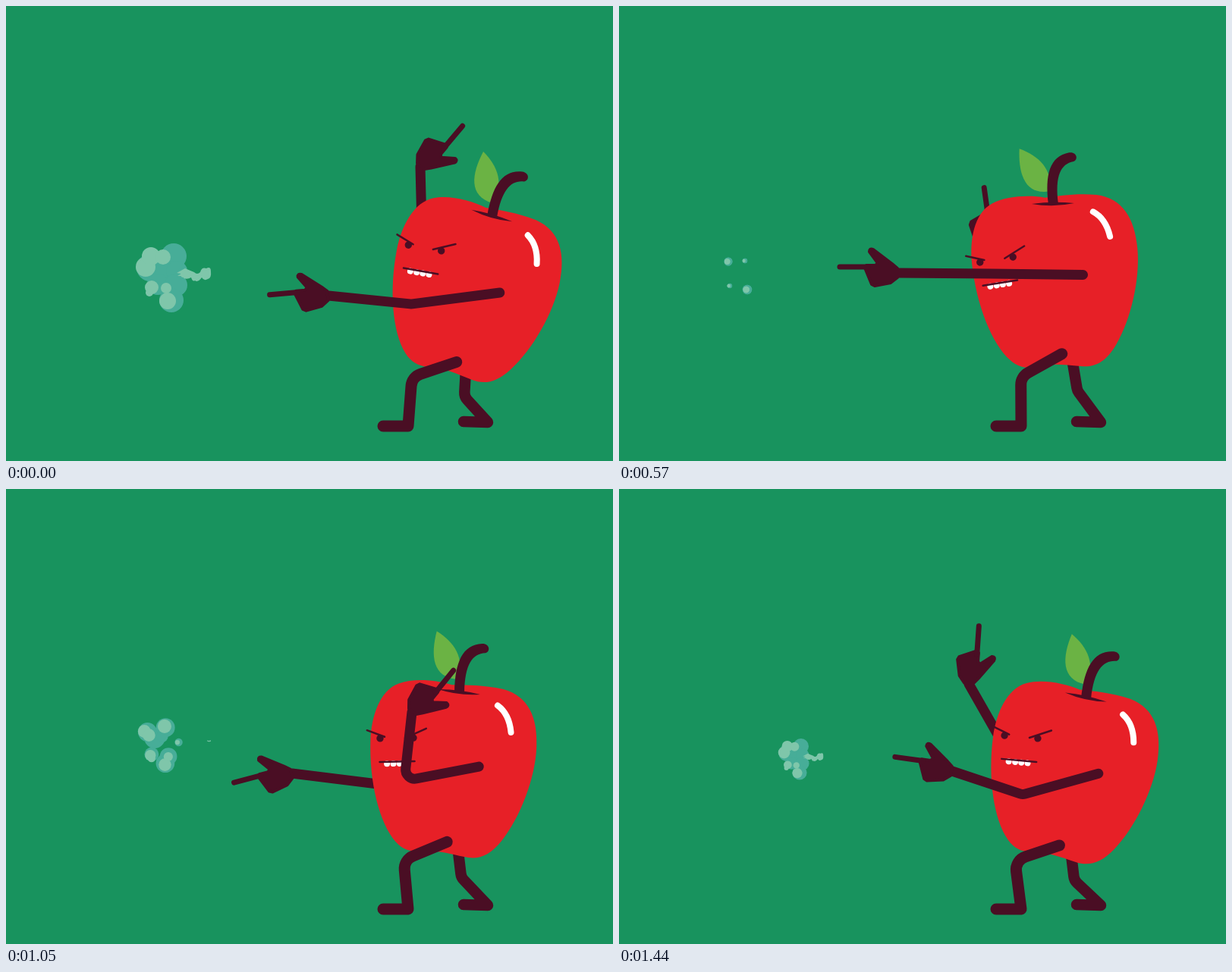
An HTML page with a canvas that plays this animation: 800x600 px, repeating every 1.47 s.

```html
<!DOCTYPE html>
<html lang="en">
<head>
<meta charset="utf-8">
<title>Finger-gun apple</title>
<style>
  html, body { margin: 0; overflow: hidden; }
  canvas { display: block; }
</style>
</head>
<body>
<canvas id="stage" width="800" height="600"></canvas>
<script>
const ctx = document.getElementById('stage').getContext('2d');
const LOOP = 1470, STEP = 30;
const GREEN = '#18935e', RED = '#e72027', DARK = '#4a0e24', LEAF = '#6bb344';
const MIST = '#47ad98', FOAM = '#7fc6aa';

// Tracks: [time, ...values]
const bodyTrack = [ // stem foot x, y, lean
  [0, 640, 278, 13], [30, 642, 277, 13.5], [360, 597, 258, 0], [570, 572, 262, -4],
  [675, 566, 264, -4], [750, 628, 268, 11], [780, 630, 267, 11.5], [1050, 597, 269, 4],
  [1290, 568, 268, -1], [1395, 564, 270, -2], [1440, 615, 276, 9.5]];
const faceTrack = [ // offset from the stem foot, tilt
  [0, -88, 41, 10], [360, -82.5, 62.5, -1], [570, -74.5, 72.5, -9], [675, -74, 72, -9],
  [750, -90, 50, 6], [1050, -82, 59.5, -1], [1290, -73, 67, -8], [1395, -73, 67, -8],
  [1440, -85, 51, 5]];
const frontArm = [ // elbow, wrist, hand angle
  [0, 534, 393, 425, 382, -5], [360, 498, 352, 368, 352, -4], [570, 490, 353, 368, 352, 0],
  [690, 530, 330, 440, 280, 80], [750, 557, 317, 553, 233, 138], [795, 556, 310, 556, 213, 136],
  [1050, 525, 385, 535, 294, 129], [1290, 529, 415, 472, 350, 56],
  [1395, 475, 370, 350, 360, 2], [1440, 532, 403, 439, 372, 8]];
const backArm = [ // hidden end, wrist, hand angle
  [0, 548, 290, 546, 212, 130], [30, 548, 290, 547, 210, 131], [360, 548, 310, 540, 268, 130],
  [570, 510, 350, 484, 317, 82], [675, 520, 375, 365, 342, 2], [720, 525, 398, 434, 345, 12],
  [750, 530, 403, 436, 347, 14], [1050, 530, 394, 377, 375, -15], [1290, 520, 380, 346, 371, 0],
  [1410, 520, 370, 400, 320, 55], [1440, 518, 357, 461, 257, 94]];
const backKnee = [
  [0, 604, 515], [360, 609, 504], [570, 604, 507], [750, 603, 513],
  [1050, 600, 512], [1290, 598, 511], [1440, 600, 516]];

// Cyclic cubic interpolation that never overshoots a key
function sample(track, t) {
  const n = track.length;
  const i = track.findLastIndex(k => k[0] <= t);
  const key = j => {
    const k = track[(j + n) % n].slice();
    k[0] += Math.floor(j / n) * LOOP;
    return k;
  };
  const [p, a, b, c] = [i - 1, i, i + 1, i + 2].map(key);
  const span = b[0] - a[0], u = (t - a[0]) / span;
  const tangent = (s, r) => s * r > 0 ? 2 * s * r / (s + r) : 0;
  return a.map((v, j) => {
    const slope = (q, r) => (r[j] - q[j]) / (r[0] - q[0]);
    const mid = slope(a, b);
    const m0 = tangent(slope(p, a), mid) * span, m1 = tangent(mid, slope(b, c)) * span;
    const d = b[j] - v;
    return v + u * (m0 + u * (3 * d - 2 * m0 - m1 + u * (m0 + m1 - 2 * d)));
  }).slice(1);
}

const rad = deg => deg * Math.PI / 180;

function within(x, y, deg, draw) {
  ctx.save();
  ctx.translate(x, y);
  ctx.rotate(rad(deg));
  draw();
  ctx.restore();
}

function fill(path, color) {
  ctx.fillStyle = color;
  ctx.fill(new Path2D(path));
}

function stroke(path, color, width) {
  ctx.strokeStyle = color;
  ctx.lineWidth = width;
  ctx.stroke(new Path2D(path));
}

function dot(x, y, r, color) {
  ctx.fillStyle = color;
  ctx.beginPath();
  ctx.arc(x, y, Math.max(r, 0), 0, 2 * Math.PI);
  ctx.fill();
}

// Bent limb with a rounded joint and an optional foot
function limb(start, joint, end, radius, width, toe) {
  ctx.strokeStyle = DARK;
  ctx.lineWidth = width;
  ctx.beginPath();
  ctx.moveTo(...start);
  ctx.arcTo(...joint, ...end, radius);
  ctx.lineTo(...end);
  if (toe) ctx.lineTo(...toe);
  ctx.stroke();
}

function kneeOf([hx, hy], [ax, ay], thigh, shin) {
  const dx = ax - hx, dy = ay - hy, dist = Math.hypot(dx, dy);
  const along = (thigh ** 2 - shin ** 2 + dist ** 2) / (2 * dist);
  const out = Math.sqrt(Math.max(0, thigh ** 2 - along ** 2));
  return [hx + (dx * along - dy * out) / dist, hy + (dy * along + dx * out) / dist];
}

function hand(x, y, deg) {
  within(x, y, deg, () => {
    const palm = 'M-44-7L-35 15-31 17-10 13-1 6-1-6-8-12-33-31Q-38-33-38-28L-27-13-30-10-42-10Z';
    fill(palm, DARK);
    stroke(palm, DARK, 4);
    stroke('M-40-8H-77', DARK, 7);
  });
}

function apple(lean) {
  within(-3, -18, lean * .5, () => fill('M-34-60C-39-27-33 2 0 0C7-28-9-48-34-60Z', LEAF));
  fill('M-10-10C-30-15-60-16-80-7C-105 4-113 40-112 70C-110 125-93 178-70 201' +
    'C-60 211-50 213-38 212C-15 208 0 212 22 215C40 218 55 212 70 190' +
    'C92 158 108 105 107 65C106 25 92-2 58-9C30-13 10-11-10-10Z', RED);
  fill('M-28-3Q0-5 28 0Q0 4-28-3Z', DARK);
  fill('M-6-1C-8-40 0-64 26-67C36-68 38-57 31-55C14-53 5-38 7-1Z', DARK);
  stroke('M52 13Q68 23 72 47', '#fff', 8);
}

function face() {
  for (const x of [-22, 22]) dot(x, 0, 4.7, DARK);
  stroke('M-39-11L-16-2M11 0L39-12', DARK, 2.5);
  for (const x of [-13.5, -5, 3.2, 11.5]) dot(x, 33.5, 4, '#fff');
  stroke('M-23 31H23', DARK, 2.5);
}

// Puffs: cluster, then x, y, r when fresh and x, y, r when breaking up
const drops = [[144, 337, 5.5], [166, 336, 3.2], [146, 369, 3.2], [169, 374, 6.2], [192, 353, 0]];
const mistPuffs = [
  [0, 190, 345, 18, 162, 339, 12], [0, 204, 352, 19, 171, 347, 13],
  [1, 221, 330, 17, 185, 334, 12], [1, 225, 350, 14, 180, 345, 7],
  [2, 200, 367, 14, 167, 369, 9], [3, 224, 368, 15, 189, 372, 11],
  [3, 218, 388, 16, 185, 380, 12], [4, 232, 353, 7, 203, 353, 5]];
const foamPuffs = [
  [0, 184, 344, 13, 158, 338, 8], [0, 191, 330, 12, 164, 345, 8],
  [1, 207, 331, 10, 185, 332, 9], [2, 192, 371, 9, 166, 370, 7],
  [2, 189, 378, 5, 168, 374, 5], [3, 213, 389, 11, 185, 382, 8],
  [3, 211, 372, 7, 190, 372, 6], [4, 234, 354, 4, 201, 353, 3]];

function smoke(age, dx, dy) {
  if (age < -45 || age > 645) return;
  const mix = (a, b, u) => a + (b - a) * u;
  const early = Math.min(Math.max(age - 20, 0) / 340, 1);
  const late = Math.min(Math.max(age - 360, 0) / 210, 1);
  const fade = Math.min(1, (645 - age) / 75);
  const puffs = (list, color, shift, size) => {
    for (const [cluster, ...p] of list) {
      const [x, y, r] = drops[cluster].map((d, i) => mix(mix(p[i], p[i + 3], early),
        i === 0 ? d - shift : i === 2 ? d * size : d, late));
      dot(x, y, r * fade, color);
    }
  };
  ctx.save();
  ctx.translate(dx, dy);
  if (age < 0) {
    const grow = 1 + age / 75;
    ctx.translate(268, 353);
    ctx.scale(grow, grow);
    ctx.translate(-268, -353);
  }
  puffs(mistPuffs, MIST, 0, 1);
  puffs(foamPuffs, FOAM, 1.3, .68);
  const tail = 1 - early * .97;
  if (late === 0) {
    ctx.translate(245, 351);
    ctx.scale(tail, tail);
    fill('M-20 1L-9-5Q-2-2 3 0Q7 4 11 0Q13-7 19-5Q25-8 25-1Q26 8 21 9Q16 12 13 7' +
      'Q8 14 4 11Q1 13-1 7Q-6 10-11 8L-10 5-19 5-14 2Z', FOAM);
  }
  ctx.restore();
}

function draw(t) {
  const [x, y, lean] = sample(bodyTrack, t);
  const [fx, fy, tilt] = sample(faceTrack, t);
  const [ex, ey, wx, wy, aim] = sample(frontArm, t);
  const [bx, by, vx, vy, backAim] = sample(backArm, t);
  const cos = Math.cos(rad(lean)), sin = Math.sin(rad(lean));
  const onBody = (px, py) => [x + px * cos - py * sin, y + px * sin + py * cos];

  ctx.fillStyle = GREEN;
  ctx.fillRect(0, 0, 800, 600);
  ctx.lineCap = ctx.lineJoin = 'round';

  smoke(t > 1400 ? t - LOOP : t, 0, 0);
  smoke(t - 720, 22, -19);

  limb(onBody(9, 185), sample(backKnee, t), [635, 549], 14, 14.5, [603, 548]);
  limb([bx, by], [(bx + vx) / 2, (by + vy) / 2], [vx, vy], 0, 13);
  hand(vx, vy, backAim);

  within(x, y, lean, () => apple(lean));
  within(x + fx, y + fy, tilt, face);

  const hip = onBody(-2, 197), ankle = [530, 554];
  limb(hip, kneeOf(hip, ankle, 62, 65), ankle, 18, 15, [497, 554]);
  limb(onBody(33, 95), [ex, ey], [wx, wy], 12, 13);
  hand(wx, wy, aim);
}

const start = performance.now();
function tick() {
  const t = (performance.now() - start) % LOOP;
  draw(Math.floor(t / STEP) * STEP);
  requestAnimationFrame(tick);
}
tick();
</script>
</body>
</html>
```
